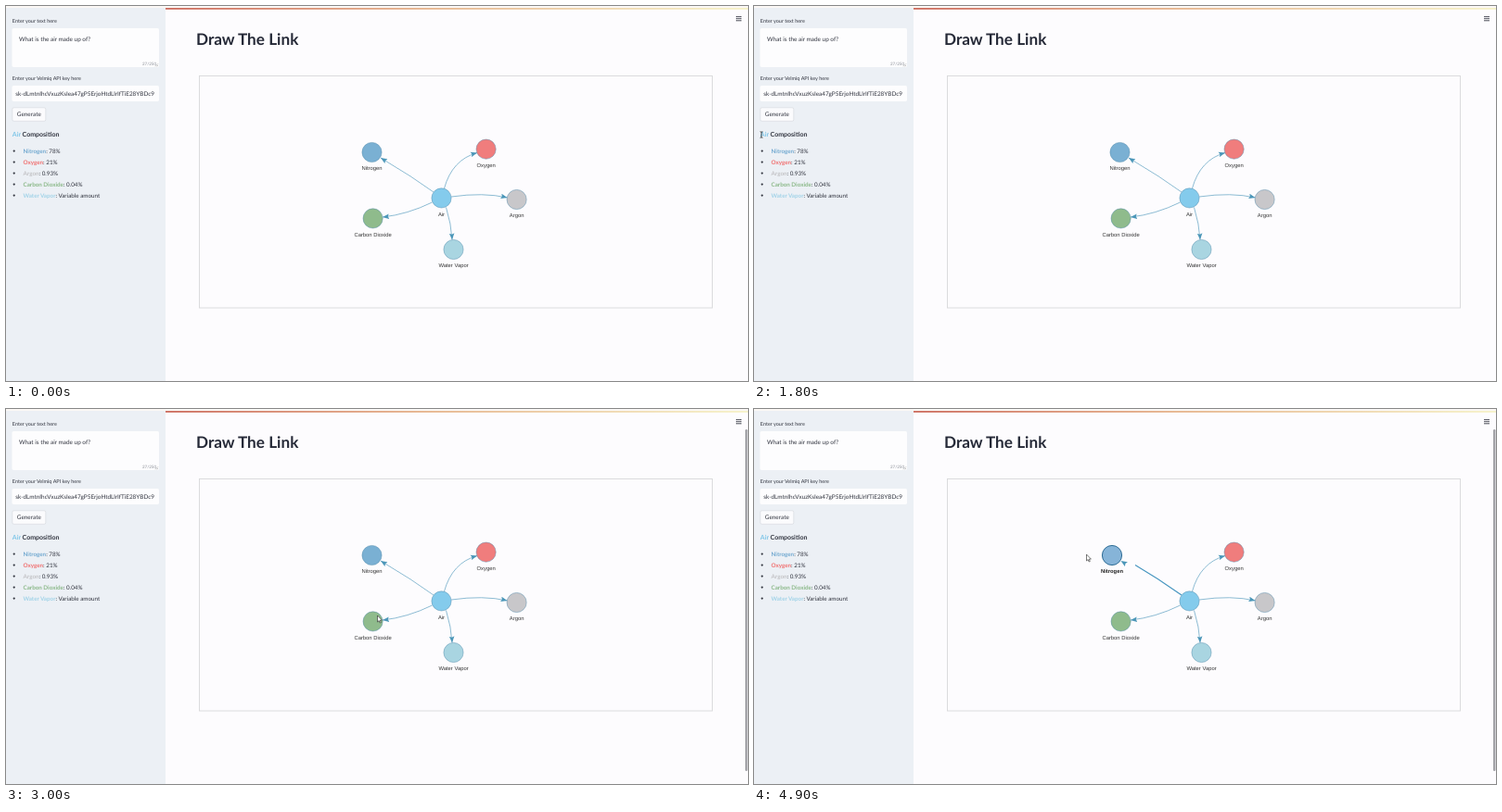
Animation of 800x405 px, one loop 5 s. Source, as an HTML page:

```html
<!DOCTYPE html>
<html lang="en">
<head>
<meta charset="utf-8">
<title>Concept graph</title>
<style>
  html, body { margin: 0; width: 100%; height: 100%; overflow: hidden; background: #fdfcfe; }
  svg { display: block; width: 100%; height: 100%; }
  text { font: 6.4px Lato, "Open Sans", sans-serif; fill: #31343f; text-rendering: geometricPrecision; white-space: pre; }
  .title { font-size: 17.2px; font-weight: 700; fill: #262a38; }
  .label { font-size: 5.5px; }
  .count { font-size: 4.5px; fill: #8a8d96; text-anchor: end; }
  .head { font-size: 7px; font-weight: 700; }
  .list text { font-size: 6.28px; }
  .list tspan { font-weight: 700; }
  .node text { font: 5.85px "Liberation Sans", Arial, sans-serif; fill: #343434; text-anchor: middle; }
  .node circle { stroke: #4d87a8; stroke-width: .45; }
  .node.on text { font-weight: 700; fill: #222; }
  .node.on circle { stroke: #2f6d96; stroke-width: 1; fill: #86b4d8; }
  .edge { fill: none; stroke: #5c9fc0; stroke-width: .7; }
  .edge.on { stroke: #4796c0; stroke-width: 1.2; }
  .tip text { font: 5.95px "DejaVu Sans", Verdana, sans-serif; fill: #222; }
  .tip rect { fill: #f5f4ed; stroke: #808074; stroke-width: .5; filter: drop-shadow(1px 1px 1.5px rgba(0,0,0,.25)); }
</style>
</head>
<body>
<svg viewBox="0 0 800 405" preserveAspectRatio="none">
  <defs>
    <linearGradient id="bar">
      <stop offset="0" stop-color="#cc6a5c"/>
      <stop offset=".45" stop-color="#e6b48c"/>
      <stop offset="1" stop-color="#f6f2c8"/>
    </linearGradient>
    <marker id="head" markerUnits="userSpaceOnUse" markerWidth="8" markerHeight="6" refX="7" refY="3" orient="auto">
      <path d="M0 .2L7 3L0 5.8L1.2 3Z" fill="#4a96b8"/>
    </marker>
    <clipPath id="selClip"><rect id="selArea" x="6.5" y="134" height="10" width="0"/></clipPath>
    <path id="arrow" d="M0 0V7L1.6 5.6L2.7 8L3.8 7.5L2.7 5.2L4.9 5.1Z" fill="#fff" stroke="#222" stroke-width=".6" stroke-linejoin="round"/>
    <path id="beam" d="M-1.4 -3.3Q0 -3.3 0 -2.6Q0 -3.3 1.4 -3.3M0 -2.8V2.8M-1.4 3.3Q0 3.3 0 2.6Q0 3.3 1.4 3.3" fill="none" stroke="#222" stroke-width=".75"/>
  </defs>

  <rect width="800" height="405" fill="#fdfcfe"/>
  <rect width="172" height="405" fill="#ecf0f5"/>
  <rect width="800" height="2" fill="#fbf8f5"/>
  <rect x="172" y="2" width="628" height="1.8" fill="url(#bar)"/>

  <text class="label" x="6.8" y="17.5">Enter your text here</text>
  <rect x="6.5" y="24" width="158.5" height="42" rx="1.7" fill="#fdfdfe"/>
  <text x="14" y="38">What is the air made up of?</text>
  <text class="count" x="162" y="64">27/250</text>
  <path d="M161 65.3L164 62.3M162.7 65.3L164 64" stroke="#888" stroke-width=".5"/>

  <text class="label" x="6.8" y="79.6">Enter your Velmiq API key here</text>
  <rect x="6.5" y="86" width="158.5" height="17" rx="1.7" fill="#fdfdfe"/>
  <text x="10.3" y="96.7">sk-dLmtnIhcVxuzKsIea47gP5ErjoHtdLlrIfTiE28YBDc9</text>

  <rect x="6.8" y="109.8" width="36" height="14.5" rx="1.7" fill="#fbfbfd" stroke="#d2d5db" stroke-width=".6"/>
  <text x="24.8" y="119.2" text-anchor="middle" font-size="6.3">Generate</text>

  <text class="head" x="6.8" y="141.3"><tspan fill="#7fc6e8">Air</tspan> Composition</text>
  <g id="sel" clip-path="url(#selClip)">
    <rect x="6" y="134" width="60" height="10" fill="#338fee"/>
    <text class="head" x="6.8" y="141.3" style="fill:#fff">Air Composition</text>
  </g>
  <g class="list" id="list"></g>

  <text class="title" x="205" y="41.8">Draw The Link</text>
  <path d="M787 11.6H793M787 13.7H793M787 15.8H793" stroke="#3a3d48" stroke-width=".9"/>
  <rect x="208.5" y="75.5" width="553" height="250.5" fill="none" stroke="#d8d8da" stroke-width=".9"/>
  <g id="edges"></g>
  <g id="nodes"></g>
  <rect id="scroll" x="797" y="22" width="2.5" height="369" rx="1.2" fill="#a3a3a8"/>
  <g class="tip" id="tip">
    <rect x="391.7" y="146.2" width="82.6" height="11.6" rx="1.3"/>
    <text x="394" y="154.2">78% of the air we breathe</text>
  </g>
  <path id="smudge" d="M467.3 212.4Q469 214 471.8 213.6" fill="none" stroke="#3b6c86" stroke-width=".7"/>
  <use id="trail0" href="#arrow" x="366.5" y="98.5"/>
  <use id="trail1" href="#arrow" x="396" y="212"/>
  <use id="trail2" href="#arrow" x="114" y="206"/>
  <use id="cursor" href="#arrow"/>
</svg>
<script>
const $ = id => document.getElementById(id);
const show = (id, on) => { $(id).style.display = on ? '' : 'none'; };

// name, amount, list colour
const items = [
  ['Nitrogen', '78%', '#72a9d0'],
  ['Oxygen', '21%', '#f07070'],
  ['Argon', '0.93%', '#c3c3c6'],
  ['Carbon Dioxide', '0.04%', '#8ab888'],
  ['Water Vapor', 'Variable amount', '#a2d3e8']
];
$('list').innerHTML = items.map(([name, amount, color], i) => {
  const y = 158.6 + i * 12;
  return `<circle cx="8.7" cy="${y - 2}" r="1.1" fill="#31343f"/>` +
    `<text x="18.5" y="${y}"><tspan fill="${color}">${name}</tspan>: ${amount}</text>`;
}).join('');

const nodes = [
  ['Nitrogen', 394.5, 158, '#7ab0d3'],
  ['Oxygen', 517.6, 154.6, '#f07d7d'],
  ['Argon', 550.6, 209, '#c8c7ca'],
  ['Carbon Dioxide', 395.6, 229.4, '#8fbb8c'],
  ['Water Vapor', 482.5, 263, '#a9d5e1'],
  ['Air', 469.5, 207.4, '#84cbec']
];
$('nodes').innerHTML = nodes.map(([name, x, y, color]) =>
  `<g class="node"><circle cx="${x}" cy="${y}" r="10.6" fill="${color}"/>` +
  `<text x="${x}" y="${y + 19.4}">${name}</text></g>`).join('');

const curves = [
  'M472.5 197Q481 166 508 158.5',
  'M480 206Q515 201 540.5 207',
  'M459.5 212Q433 225 406 228',
  'M474.5 217.5Q480 235 481 252.5'
];
$('edges').innerHTML =
  '<path class="edge" id="link"/><path class="edge" id="linkHead" d="M411 168.4L404 164" marker-end="url(#head)"/>' +
  curves.map(d => `<path class="edge" d="${d}" marker-end="url(#head)"/>`).join('');
const nitrogen = $('nodes').firstChild;

// pointer route: step, x, y
const route = [
  [1, 150, 300], [3, 300, 120], [5, 520, 150], [6, 470, 200], [9, 366.5, 98.5],
  [13, 94, 42], [17, 8, 139], [19, 8, 139], [24, 41, 155.5], [30, 400.5, 223],
  [33, 440, 150], [35, 390.5, 159], [37, 390.5, 159], [38, 396, 212], [40, 114, 206],
  [42, 457, 198], [44, 470, 250], [46, 394, 158], [48, 375, 158], [49, 358.5, 157]
];
function pointer(step) {
  const i = Math.max(1, route.findIndex(p => p[0] >= step));
  const [a, x0, y0] = route[i - 1], [b, x1, y1] = route[i];
  const k = (step - a) / (b - a);
  return [x0 + (x1 - x0) * k, y0 + (y1 - y0) * k];
}

function draw(step) {
  const within = (a, b) => step >= a && step <= b;
  const [x, y] = pointer(step);
  const typing = within(12, 24) && step !== 16;
  show('cursor', step > 0);
  $('cursor').setAttribute('href', typing ? '#beam' : '#arrow');
  $('cursor').setAttribute('transform', `translate(${x} ${y})`);

  show('trail0', within(9, 13));
  show('trail1', within(38, 42));
  show('trail2', within(40, 42));
  show('smudge', step === 42);
  show('tip', within(36, 37));
  show('scroll', step >= 27 || (step > 0 && x > 172));

  show('sel', within(20, 24));
  $('selArea').setAttribute('width', within(20, 24) ? (step - 19) * 5.1 : 0);

  const held = step >= 46;
  const dx = -4.25 * Math.min(2, Math.max(0, step - 46));
  nitrogen.setAttribute('class', held ? 'node on' : 'node');
  nitrogen.setAttribute('transform', `translate(${dx} 0)`);
  $('link').setAttribute('class', held ? 'edge on' : 'edge');
  $('link').setAttribute('d', 'M461 201Q436 183 411 168.4');
  $('linkHead').setAttribute('transform', `translate(${dx} 0)`);
  $('linkHead').style.stroke = dx ? 'none' : '';
}

let last = -1;
function tick() {
  const step = Math.floor(performance.now() % 5000 / 100);
  if (step !== last) draw(last = step);
  requestAnimationFrame(tick);
}
tick();
</script>
</body>
</html>
```
